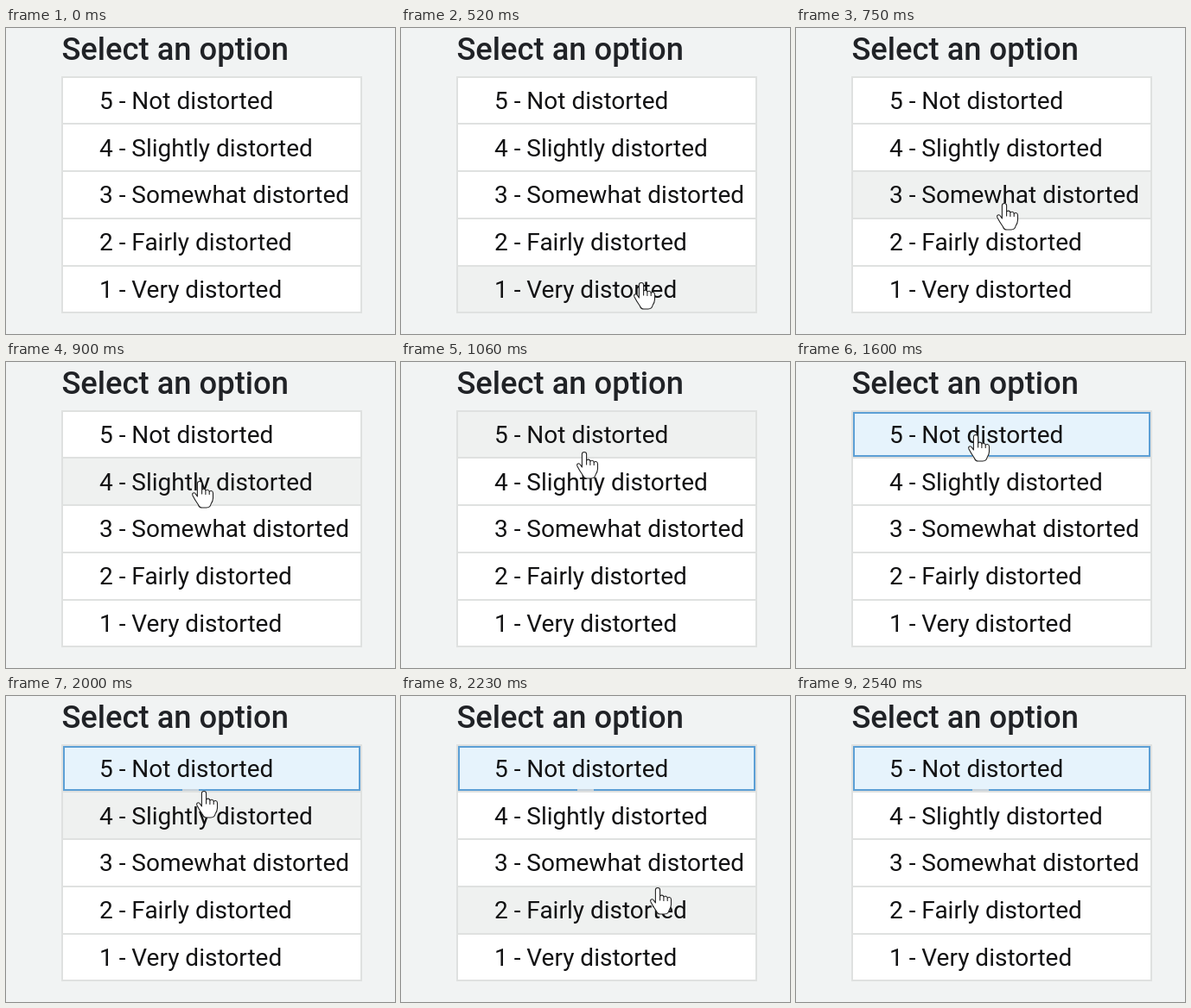
Animation, 450 px wide and 355 px high, one loop 3.38 s. Source, as an HTML page with a canvas:

```html
<!DOCTYPE html>
<html lang="en">
<head>
<meta charset="utf-8">
<title>Select an option</title>
<style>
  html, body { margin: 0; width: 100%; height: 100%; overflow: hidden; background: #f1f3f3; }
  canvas { display: block; }
</style>
</head>
<body>
<canvas id="stage" width="450" height="355"></canvas>
<script>
const ctx = document.getElementById('stage').getContext('2d');
const LOOP = 3380, STEP = 77;
const ENTER = 440, PRESS = 1380, SELECT = 1600, LEAVE = 2000, GONE = 2540;
const FONT = 'Roboto, Arial, sans-serif';
const OPTIONS = ['5 - Not', '4 - Slightly', '3 - Somewhat', '2 - Fairly', '1 - Very'];
const LIST = { x: 64, y: 55.75, w: 348, row: 54.7, line: 2 };

// Key points of the pointer: step, fingertip x, fingertip y
const PATH_IN = [[0, 290, 325], [4, 241, 203], [6, 224, 138], [8, 212, 104], [10, 208, 84]];
const PATH_OUT = [[0, 229, 110], [3, 297, 222], [6, 344, 322]];

const rowTop = i => Math.round(LIST.y + i * LIST.row);

// The pointer is sampled once per STEP, with a little slack for rounded times
function along(path, elapsed) {
  const last = path[path.length - 1];
  const k = Math.min(Math.floor((elapsed + 4) / STEP), last[0]);
  const n = Math.max(1, path.findIndex(p => p[0] >= k));
  const a = path[n - 1], b = path[n];
  const u = (k - a[0]) / (b[0] - a[0]);
  return { x: Math.round(a[1] + (b[1] - a[1]) * u), y: Math.round(a[2] + (b[2] - a[2]) * u) };
}

function pointerAt(t) {
  if (t < ENTER || t >= GONE) return null;
  return t < LEAVE ? along(PATH_IN, t - ENTER) : along(PATH_OUT, t - LEAVE);
}

function rect(x, y, w, h, color) {
  ctx.fillStyle = color;
  ctx.fillRect(x, y, w, h);
}

function label(text, x, y, font, color) {
  ctx.font = font + ' ' + FONT;
  ctx.fillStyle = color;
  ctx.fillText(text, x, y);
}

function drawSelection() {
  const top = rowTop(0) + LIST.line;
  rect(66, top, 344, 52, '#e6f3fc');
  ctx.strokeStyle = '#5c9fd5';
  ctx.lineWidth = 2;
  ctx.strokeRect(67, top + 1, 342, 50);
  rect(204, top + 50, 19, 2, '#c6d1d9');
}

function drawList(hover, selected) {
  const { x, w, row, line } = LIST;
  rect(x, rowTop(0), w, rowTop(5) + line - rowTop(0), '#dfe1e0');
  OPTIONS.forEach((name, i) => {
    const top = rowTop(i) + line;
    rect(x + line, top, w - 2 * line, rowTop(i + 1) - top, i === hover ? '#eff1f0' : '#fff');
    if (i === 0 && selected) drawSelection();
    label(name + ' distorted', 108, Math.round(93.9 + i * row), '28px', '#121213');
  });
}

function drawHand(x, y) {
  ctx.save();
  ctx.translate(x, y);
  ctx.lineJoin = ctx.lineCap = 'round';
  ctx.lineWidth = 1.1;
  ctx.strokeStyle = '#222';
  ctx.fillStyle = '#fff';
  ctx.beginPath();
  ctx.moveTo(-2.6, 18);
  ctx.lineTo(-2.6, 3);
  ctx.bezierCurveTo(-2.6, -0.4, 2.6, -0.4, 2.6, 3);
  ctx.lineTo(2.6, 15);
  // three folded fingers, each a little lower than the one before
  for (let i = 0; i < 3; i++) {
    const left = 2.6 + i * 4.3, top = 8.5 + i * 1.2;
    ctx.lineTo(left, top + 2);
    ctx.bezierCurveTo(left + 0.5, top, left + 4.2, top, left + 4.3, top + 3);
    ctx.lineTo(left + 4.3, 15.5);
  }
  ctx.lineTo(15.5, 20);
  ctx.quadraticCurveTo(15.3, 23.5, 13.2, 26.5);
  ctx.quadraticCurveTo(12.2, 31, 8, 31);
  ctx.lineTo(3, 31);
  ctx.quadraticCurveTo(-0.6, 31, -1.6, 27.5);
  ctx.quadraticCurveTo(-5.5, 22, -8, 17);
  ctx.bezierCurveTo(-9.4, 13.8, -6, 12.6, -4.4, 15.4);
  ctx.closePath();
  ctx.fill();
  ctx.stroke();
  ctx.restore();
}

function drawPress() {
  ctx.fillStyle = 'rgba(250, 242, 0, 0.58)';
  ctx.beginPath();
  ctx.arc(209, 84, 20.7, 0, Math.PI * 2);
  ctx.fill();
}

function draw(t) {
  const p = pointerAt(t);
  const hover = p && p.y < 320 ? Math.floor((p.y - 55) / LIST.row) : -1;
  rect(0, 0, 450, 355, '#f1f3f3');
  label('Select an option', 64.4, 37, '500 36.3px', '#202226');
  drawList(hover, t >= SELECT);
  if (p) drawHand(p.x, p.y);
  if (t >= PRESS && t < SELECT) drawPress();
}

const start = performance.now();
function tick() {
  draw((performance.now() - start) % LOOP);
  requestAnimationFrame(tick);
}
tick();
</script>
</body>
</html>
```
